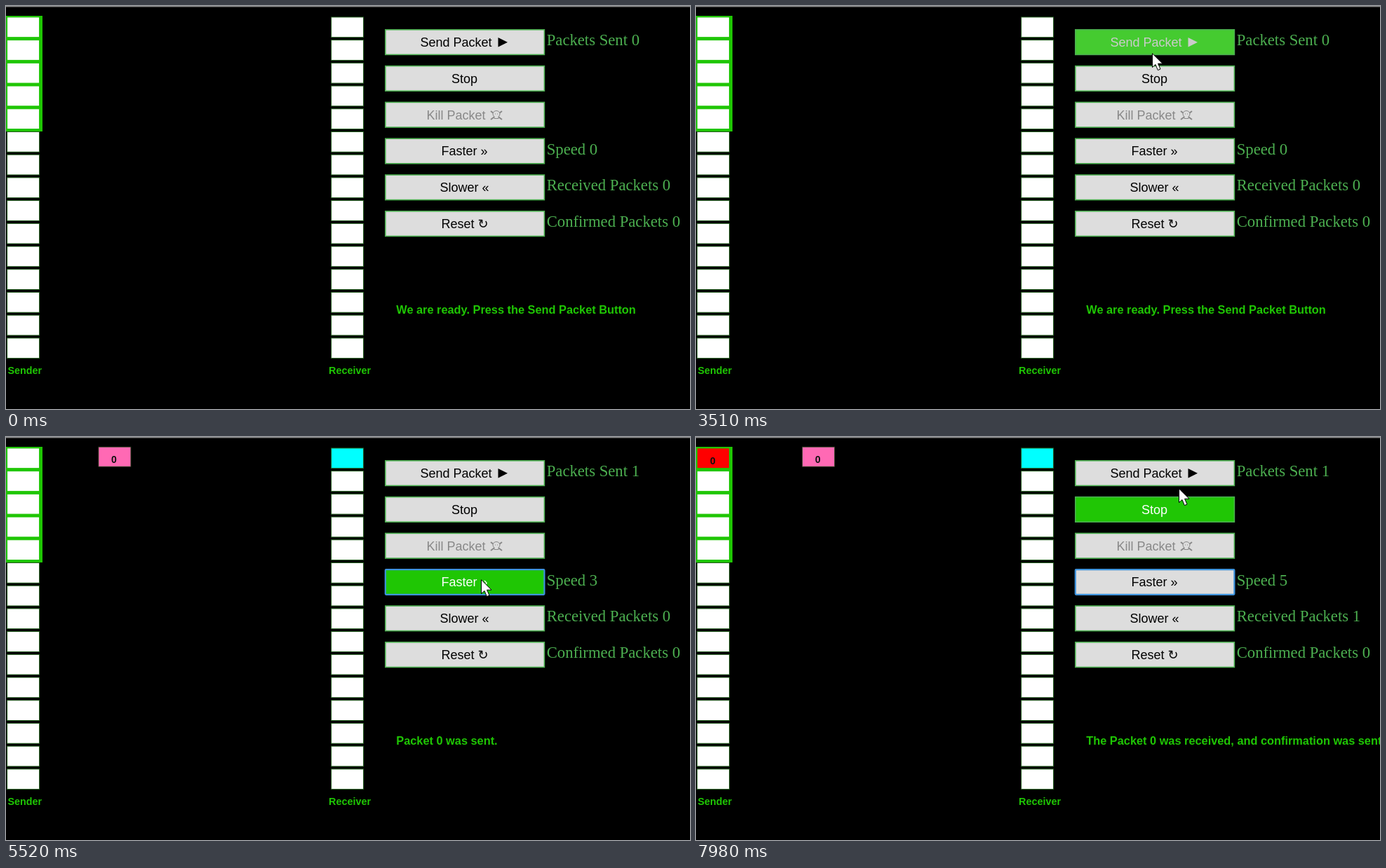
Animation of 975 by 575 pixels, one loop 8 s. Source, as an HTML page:

```html
<!DOCTYPE html>
<html lang="en">
<head>
<meta charset="utf-8">
<title>Packet window demo</title>
<style>
html, body { margin: 0; width: 100%; height: 100%; overflow: hidden; background: #000; }
svg { display: block; width: 975px; height: 575px; }
text { white-space: pre; font-family: Arial, "Liberation Sans", sans-serif; }
.bold { font-weight: bold; fill: #1fc604; }
.stat { font: 22.7px "Times New Roman", "Liberation Serif", serif; fill: #4caf50; }
.num { font-weight: bold; font-size: 14px; fill: #111; text-anchor: middle; }
.label { font-size: 18px; }
</style>
</head>
<body>
<svg id="stage" viewBox="0 0 975 575"></svg>
<script>
const LOOP = 8000, STEP = 76.67, FADE = 400, DT = 10;
const SENT = 3676, RECEIVER_X = 462;
const GREEN = [31, 198, 4], GREY = [221, 221, 221], BLACK = [0, 0, 0], WHITE = [255, 255, 255];
const stage = document.getElementById('stage');

function add(tag, attrs, parent = stage, text = '') {
  const el = document.createElementNS('http://www.w3.org/2000/svg', tag);
  for (const k in attrs) el.setAttribute(k, attrs[k]);
  el.textContent = text;
  return parent.appendChild(el);
}
const rect = (x, y, width, height, fill, more, parent) =>
  add('rect', { x, y, width, height, fill, ...more }, parent);
const write = (x, y, cls, text, more, parent) =>
  add('text', { x, y, class: cls, ...more }, parent, text);

// Cursor moves: [start, end, x, y]; it rests in between
const moves = [
  [270, 340, 457, 400], [600, 890, 209, 215], [1160, 1500, 32, 31],
  [2790, 3100, 520, 158], [3100, 3235, 540, 66], [3235, 3400, 650, 67],
  [4560, 4900, 677, 203],
  [6790, 7236, 691, 122], [7236, 7279, 691, 85], [7290, 7500, 690, 105], [7900, 7969, 688, 73]
];
const clicks = [5020, 5400, 5510, 6235, 6522];

function cursorAt(t) {
  let x = 517, y = 444;
  for (const [start, end, toX, toY] of moves) {
    const p = Math.min(1, Math.max(0, (t - start) / (end - start)));
    x += (toX - x) * p;
    y += (toY - y) * p;
  }
  return [x, y];
}

// Each click on Faster adds the same amount to the packet's speed
const travelled = t => 4 + .053 * (t - SENT) +
  clicks.reduce((sum, c) => sum + .0485 * Math.max(0, t - c), 0);

// Hover strength of a button over the loop, following the cursor
function hoverCurve(top) {
  let p = 0;
  return Array.from({ length: LOOP / DT + 1 }, (_, i) => {
    const [x, y] = cursorAt(i * DT);
    const inside = x >= 540 && x <= 768 && y >= top && y <= top + 37;
    p = Math.min(1, Math.max(0, p + (inside ? DT : -DT) / FADE));
    return 1 - (1 - p) ** 2;
  });
}

// Static scene
rect(0, 0, 975, 575, '#000');
rect(0, 0, 975, 1.4, '#8c8c8c');
rect(0, 14, 52, 165, '#1fc604');
const column = (x, framed) => Array.from({ length: 15 }, (_, i) =>
  rect(x, 15.9 + i * 32.71, 46, 28.8, '#fff', { stroke: i < framed ? '#1fc604' : '#1f5a1a' }));
const [firstSender] = column(1.6, 5), [firstReceiver] = column(463.6, 0);
write(2.5, 525, 'bold', 'Sender', { 'font-size': 14.3 });
write(460, 525, 'bold', 'Receiver', { 'font-size': 14.4 });
const message = write(556.3, 438.5, 'bold', '', { 'font-size': 16.33 });
const senderNum = write(24, 38.5, 'num', '0');

const buttons = [
  { label: 'Send Packet', x: 590.5, focus: [SENT, clicks[0]] },
  { label: 'Stop', x: 635 },
  { label: 'Kill Packet', x: 599.5, disabled: true },
  { label: 'Faster »', x: 620.5, focus: [clicks[0], LOOP] },
  { label: 'Slower «', x: 618.5 },
  { label: 'Reset ↻', x: 620.5 }
].map((b, i) => {
  const y = 33 + i * 51.8;
  const box = rect(540.8, y + .8, 226.6, 35.6, '#ddd');
  const face = add('g', { fill: '#888' });
  write(b.x, y + 25, 'label', b.label, {}, face);
  return { ...b, box, face, hover: hoverCurve(y - .2) };
});
add('path', { d: 'M701.5 45v13.5l13.5-6.8z' }, buttons[0].face);
// Skull and crossbones
add('path', { d: 'M691 150l16 12M707 150l-16 12', stroke: '#888', 'stroke-width': 2 });
add('path', { d: 'M694 154a5 4.5 0 0 1 10 0q0 3-2 3.500v3h-6v-3q-2-.5-2-3.500zm3 0h1m2 0h1', fill: '#ddd', stroke: '#888' });

const stats = ['Packets Sent ', 'Speed ', 'Received Packets ', 'Confirmed Packets ']
  .map((name, i) => ({ name, el: write(770.7, i ? 159.7 + i * 51.8 : 56, 'stat', '') }));

const packet = add('g', {});
rect(.4, 14.2, 46, 28, '#ff69b4', { stroke: '#2b4a22', 'stroke-width': .8 }, packet);
write(22.5, 37, 'num', '0', {}, packet);
const cursor = add('path', {
  d: 'M.5 .8V20.5L5 16.5 8.4 24.6 12 23 8.6 15.2H15z', fill: '#fff', stroke: '#000'
});

const mix = (a, b, p) => `rgb(${a.map((v, i) => Math.round(v + (b[i] - v) * p))})`;
const show = (el, on) => el.setAttribute('visibility', on ? 'visible' : 'hidden');
const move = (el, x, y) => el.setAttribute('transform', `translate(${x} ${y})`);

function draw(now) {
  // The screen refreshes in even steps
  const t = SENT + Math.floor((now - SENT) / STEP) * STEP;
  const way = travelled(t), sent = t >= SENT, received = way > RECEIVER_X;

  for (const { box, face, hover, focus, disabled } of buttons) {
    const p = disabled ? 0 : hover[Math.max(0, Math.round(t / DT))];
    const focused = focus && t >= focus[0] && t < focus[1];
    box.setAttribute('fill', mix(GREY, GREEN, p));
    box.setAttribute('stroke', focused ? '#3d92dc' : '#4caf50');
    box.setAttribute('stroke-width', focused ? 2.2 : 1.6);
    box.setAttribute('rx', focused ? 1 : 0);
    if (!disabled) face.setAttribute('fill', mix(BLACK, WHITE, p));
  }

  const counts = [+sent, clicks.filter(c => c <= t).length, +received, 0];
  stats.forEach((s, i) => s.el.textContent = s.name + counts[i]);
  message.textContent = received ? 'The Packet 0 was received, and confirmation was sent'
    : sent ? 'Packet 0 was sent.' : 'We are ready. Press the Send Packet Button';

  firstReceiver.setAttribute('fill', sent ? '#0ff' : '#fff');
  firstSender.setAttribute('fill', received ? '#f00' : '#fff');
  show(senderNum, received);
  show(packet, sent);
  move(packet, received ? 2 * RECEIVER_X - way : way, 0);
  show(cursor, now >= 270);
  move(cursor, ...cursorAt(t));
}

let began;
function tick(now) {
  began ??= now;
  draw((now - began) % LOOP);
  requestAnimationFrame(tick);
}
draw(0);
requestAnimationFrame(tick);
</script>
</body>
</html>
```
